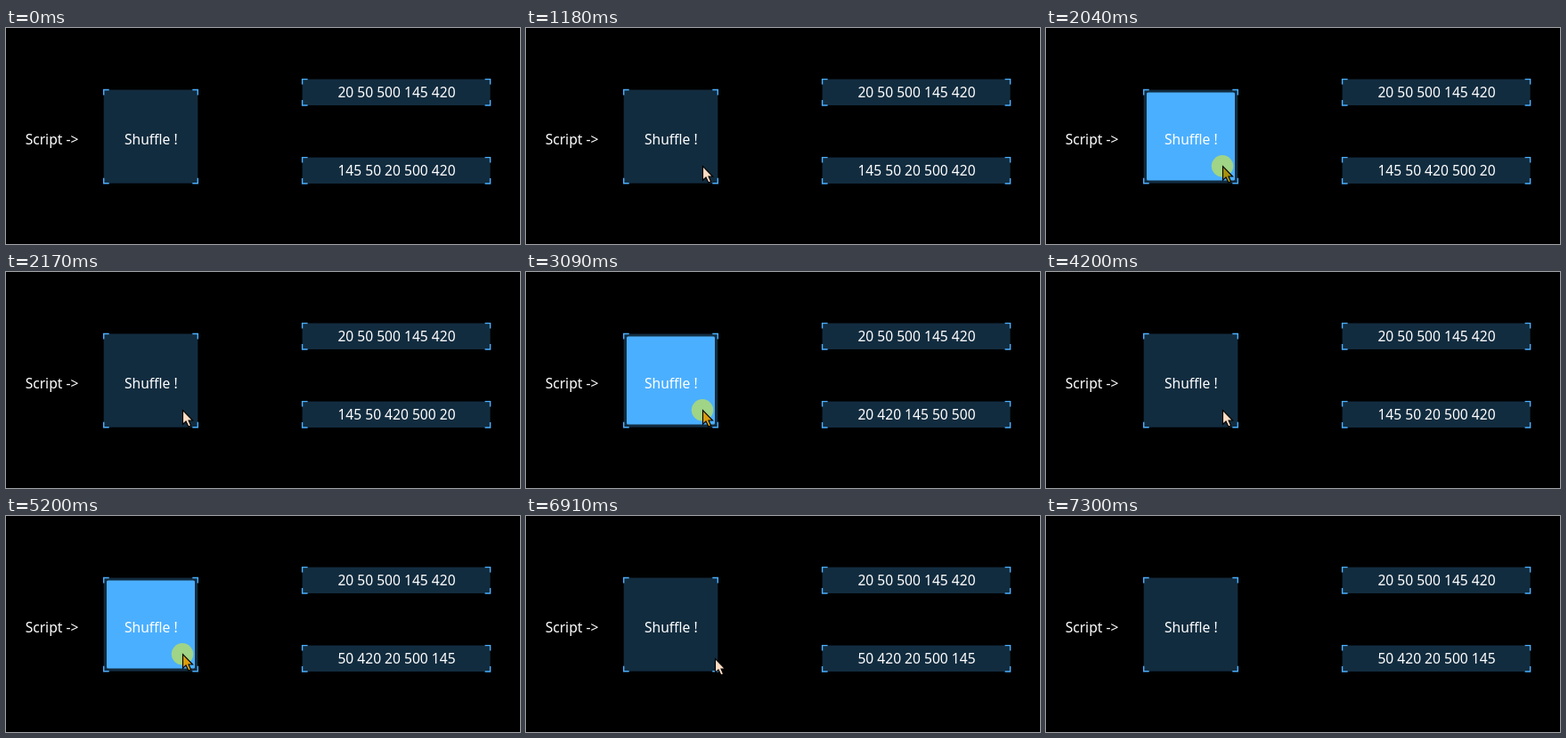
An HTML page that plays this animation: 577x243 px, repeating every 7.96 s.

```html
<!DOCTYPE html>
<html>
<head>
<meta charset="utf-8">
<style>
html, body { margin: 0; width: 100%; height: 100%; overflow: hidden; background: #000; }
svg { display: block; width: 577px; height: 243px; }
text { font: 15.6px "Noto Sans", "Open Sans", sans-serif; fill: #fff; text-anchor: middle; }
</style>
</head>
<body>
<svg viewBox="0 0 577 243">
  <g id="panels"></g>
  <rect id="press" x="113" y="72.5" width="99" height="99" rx="1.5" fill="#4bafff"/>
  <text x="51.5" y="131">Script -&gt;</text>
  <text x="162.8" y="131">Shuffle !</text>
  <text x="438.5" y="78">20 50 500 145 420</text>
  <text id="shuffled" x="438.5" y="166"></text>
  <circle id="halo" cx="198" cy="155.3" r="12.2" fill="#a0d486"/>
  <path id="cursor" d="M.5 .5V16.2L4 13L6.9 19L9.6 17.8L7 12H11.6Z" stroke="#000" stroke-width="1.1"/>
</svg>
<script>
const LOOP = 7960, STEP = 65;
const ENTER = 790, LEAVE = 6910, GONE = 7300;
const REST = [198, 155], START = [349, 197], EXIT = [449, 240];

// Each click: pressed interval, dim cursor until `dim`, and the resulting order
const clicks = [
  { down: 2040, dim: 2100, up: 2170, order: "145 50 420 500 20" },
  { down: 3090, dim: 3090, up: 3220, order: "20 420 145 50 500" },
  { down: 4070, dim: 4140, up: 4200, order: "145 50 20 500 420" },
  { down: 5200, dim: 5200, up: 5260, order: "50 420 20 500 145" },
];

const el = id => document.getElementById(id);
const show = (node, on) => node.setAttribute("visibility", on ? "visible" : "hidden");
const mix = (a, b, u) => a.map((v, i) => Math.round(v + (b[i] - v) * u));

function panel(x, y, w, h) {
  const r = x + w, b = y + h, c = 6;
  return `<rect x="${x}" y="${y}" width="${w}" height="${h}" fill="#122c3f"/>
    <path d="M${x} ${y + c}V${y}H${x + c}M${r - c} ${y}H${r}V${y + c}
    M${r} ${b - c}V${b}H${r - c}M${x + c} ${b}H${x}V${b - c}"
    fill="none" stroke="#4bafff" stroke-width="1.4"/>`;
}

function cursorAt(t) {
  if (t < ENTER || t >= GONE) return null;
  if (t >= LEAVE) {
    const u = (Math.floor((t - LEAVE) / STEP) + 1) / 6;
    return mix(REST, EXIT, u ** 1.6);
  }
  const u = Math.min(1, Math.floor((t - ENTER) / STEP) / 6);
  return mix(START, REST, 1 - (1 - u) ** 2);
}

function draw(now) {
  const t = now % LOOP;
  const last = clicks.filter(c => t >= c.down).pop();
  const pressed = !!last && t < last.up;
  el("shuffled").textContent = last ? last.order : "145 50 20 500 420";
  show(el("press"), pressed);
  show(el("halo"), pressed);

  const pos = cursorAt(t), cursor = el("cursor");
  show(cursor, pos);
  if (pos) cursor.setAttribute("transform", `translate(${pos})`);
  cursor.setAttribute("fill", !pressed ? "#ffdcc4" : t < last.dim ? "#a8900c" : "#dc9c0c");
  requestAnimationFrame(draw);
}

el("panels").innerHTML =
  panel(109.7, 69.5, 105.6, 105.2) + panel(332.6, 57.6, 211, 29.4) + panel(332.6, 145.6, 211, 29.4);
draw(performance.now());
</script>
</body>
</html>
```
